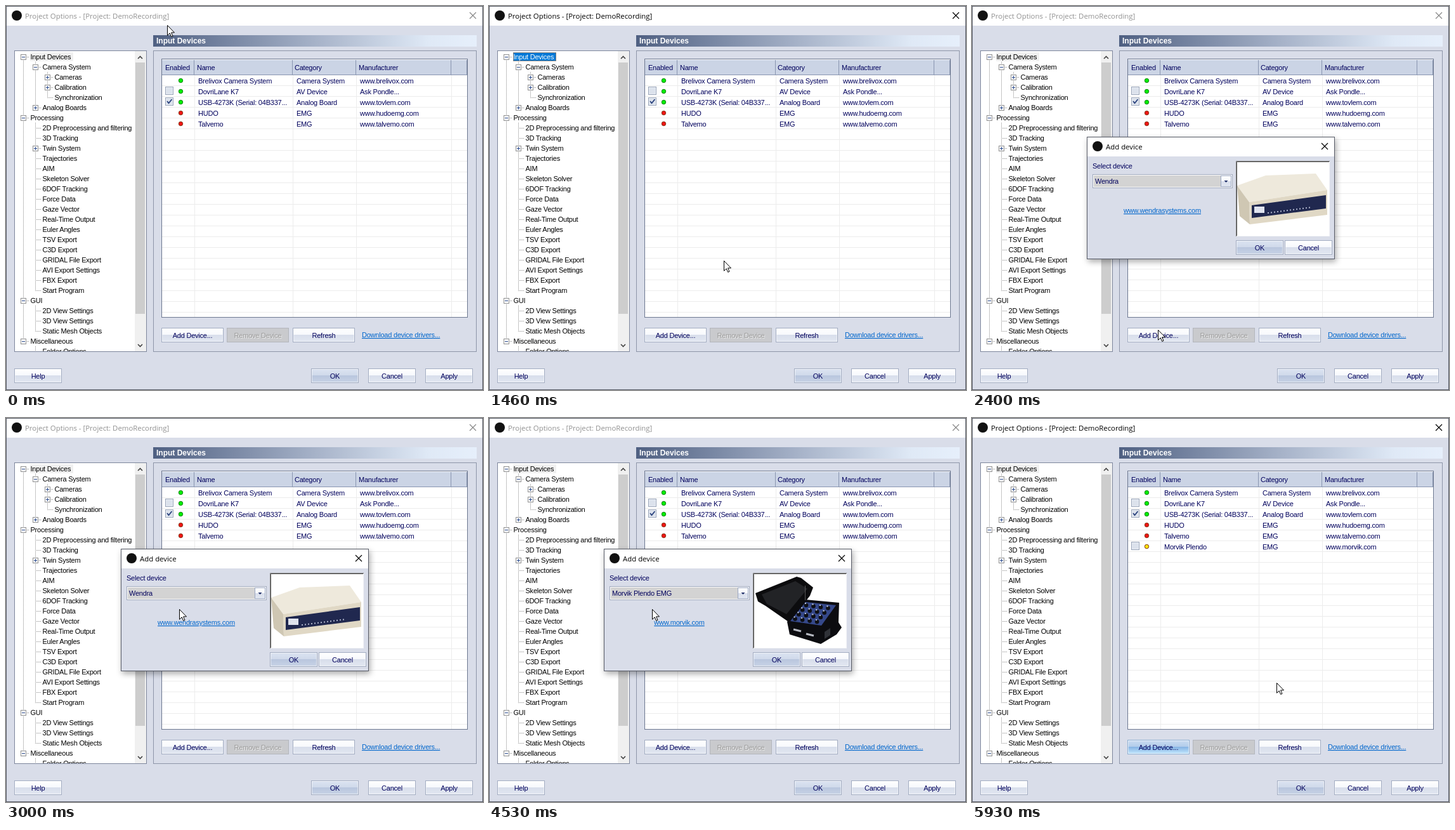
Recreate the animation shown at these times as an HTML page. Size 752 by 605 pixels, loop 6.06 s.

```html
<!DOCTYPE html>
<html lang="en">
<head>
<meta charset="utf-8">
<title>Project Options</title>
<style>
  html, body { margin: 0; width: 100%; height: 100%; overflow: hidden; background: #d9dde9; }
  svg { display: block; font: 11px "Liberation Sans", Arial, sans-serif; letter-spacing: -.22px; }
  text { white-space: pre; }
  .title { font: 11.4px "Open Sans", "Noto Sans", sans-serif; letter-spacing: 0; }
  .band { font-weight: bold; font-size: 12px; letter-spacing: 0; }
  .link { fill: #0066cc; text-decoration: underline; }
  .shadow { filter: drop-shadow(2px 4px 5px #0005); }
</style>
</head>
<body>
<svg width="752" height="605" viewBox="0 0 752 605">
  <defs>
    <linearGradient id="band">
      <stop stop-color="#4f6082"/><stop offset=".5" stop-color="#a6b2c8"/>
      <stop offset=".85" stop-color="#dfe9f6"/><stop offset="1" stop-color="#e6effb"/>
    </linearGradient>
    <linearGradient id="plain" x2="0" y2="1">
      <stop stop-color="#fff"/><stop offset=".5" stop-color="#f6f8fc"/>
      <stop offset=".5" stop-color="#d8deeb"/><stop offset="1" stop-color="#e3e8f2"/>
    </linearGradient>
    <linearGradient id="main" x2="0" y2="1">
      <stop stop-color="#dbe3f1"/><stop offset=".5" stop-color="#cfd9ea"/>
      <stop offset=".5" stop-color="#b9c6de"/><stop offset="1" stop-color="#c8d3e6"/>
    </linearGradient>
    <linearGradient id="hot" x2="0" y2="1">
      <stop stop-color="#cbdcf1"/><stop offset=".5" stop-color="#b0cbea"/>
      <stop offset=".5" stop-color="#86b4e4"/><stop offset="1" stop-color="#c4e9ff"/>
    </linearGradient>
    <linearGradient id="off"><stop stop-color="#c9cacd"/></linearGradient>
    <clipPath id="treeClip"><path d="M14 71H203V544H14Z"/></clipPath>
  </defs>
  <g id="stage"></g>
</svg>
<script>
const LOOP = 6060, NAVY = '#00005c', BODY = '#d9dde9', BLUE = '#0078d7';
const stage = document.getElementById('stage');

// Tree rows: depth, box sign ("." for none), label
const tree = `0-Input Devices|1-Camera System|2+Cameras|2+Calibration|2.Synchronization|1+Analog Boards
0-Processing|1.2D Preprocessing and filtering|1.3D Tracking|1+Twin System|1.Trajectories|1.AIM
1.Skeleton Solver|1.6DOF Tracking|1.Force Data|1.Gaze Vector|1.Real-Time Output|1.Euler Angles
1.TSV Export|1.C3D Export|1.GRIDAL File Export|1.AVI Export Settings|1.FBX Export|1.Start Program
0-GUI|1.2D View Settings|1.3D View Settings|1.Static Mesh Objects|0-Miscellaneous|1.Folder Options`
  .split(/[|\n]/);

// Table rows: check state, dot colour, name, category, maker
const devices = [
  ['', '#00f000', 'Brelivox Camera System', 'Camera System', 'www.brelivox.com'],
  ['off', '#00f000', 'DovriLane K7', 'AV Device', 'Ask Pondle...'],
  ['on', '#00f000', 'USB-4273K (Serial: 04B337...', 'Analog Board', 'www.tovlem.com'],
  ['', '#f01414', 'HUDO', 'EMG', 'www.hudoemg.com'],
  ['', '#f01414', 'Talvemo', 'EMG', 'www.talvemo.com'],
  ['off', '#ffe600', 'Morvik Plendo', 'EMG', 'www.morvik.com']
];
const choices = ['Wendra', 'Morvik Plendo EMG', 'HUDO', 'Talvemo', 'Talvemo EMG'];

// Pointer path: time, x, y
const path = [
  [0, 254, 30], [660, 112, 80], [800, 100, 80], [1000, 100, 80], [1260, 225, 200], [1460, 370, 401],
  [1660, 389, 521], [1930, 293, 515], [2330, 293, 515], [3000, 273, 301], [3260, 254, 264],
  [3660, 254, 264], [4130, 257, 301], [4530, 257, 301], [5060, 452, 376], [5460, 452, 376],
  [5860, 480, 416], [5930, 480, 417], [LOOP, 480, 417]
];

const clamp = v => Math.max(0, Math.min(1, v));

function slope(i, c) {
  const a = path[i - 1], b = path[i], d = path[i + 1];
  if (!a || !d || (b[c] - a[c]) * (d[c] - b[c]) <= 0) return 0;
  return (d[c] - a[c]) / (d[0] - a[0]);
}

function pointer(t) {
  const i = path.findIndex((p, n) => n && t <= p[0]) - 1;
  const a = path[i], b = path[i + 1], span = b[0] - a[0], u = (t - a[0]) / span, v = 1 - u;
  return [1, 2].map(c => Math.round(
    v * v * (1 + 2 * u) * a[c] + u * u * (3 - 2 * u) * b[c] +
    span * u * v * (v * slope(i, c) - u * slope(i + 1, c))));
}

const rect = (x, y, w, h, fill, line) => line
  ? `<rect x="${x + .5}" y="${y + .5}" width="${w - 1}" height="${h - 1}" fill="${fill}" stroke="${line}"/>`
  : `<rect x="${x}" y="${y}" width="${w}" height="${h}" fill="${fill}"/>`;
const text = (x, y, s, fill = NAVY, more = '') => `<text x="${x}" y="${y}" fill="${fill}" ${more}>${s}</text>`;
const stroke = (d, color, more = '') => `<path d="${d}" fill="none" stroke="${color}" ${more}/>`;
const poly = (points, fill) => `<polygon points="${points}" fill="${fill}"/>`;
const dot = (x, y, r, fill, line = 'none') => `<circle cx="${x}" cy="${y}" r="${r}" fill="${fill}" stroke="${line}"/>`;
const cross = (x, y, color) => stroke(`M${x - 5} ${y - 5}l10 10m0-10l-10 10`, color, 'stroke-width="1.2"');

function button(x, y, w, label, kind = 'plain') {
  const off = kind === 'off', mid = 'text-anchor="middle"', cx = x + w / 2;
  return rect(x, y, w, 23, `url(#${kind})`, off ? '#b3b6bd' : kind === 'hot' ? '#8fb0d3' : '#a3adc2') +
    (off ? text(cx + 1, y + 17, label, '#eee', mid) : rect(x + 1, y + 1, w - 2, 21, 'none', '#fff9')) +
    text(cx, y + 16, label, off ? '#9b9b9b' : NAVY, mid);
}

function treeView(focused) {
  const dots = 'stroke-dasharray="1 1"';
  let out = rect(13, 70, 209, 475, '#fff', '#7d869c') + '<g clip-path="url(#treeClip)">' +
    stroke('M27.5 80V528M46.5 88V160M65.5 104V144M46.5 184V448M46.5 472V512M46.5 536V545', '#8c8c8c', dots);
  tree.forEach((row, i) => {
    const x = 27 + 19 * row[0], y = 80 + 16 * i, sign = row[1];
    out += stroke(`M${x} ${y + .5}H${x + 10}`, '#8c8c8c', dots);
    if (sign !== '.') {
      out += rect(x - 4, y - 4, 9, 9, '#fff', '#919191') +
        stroke(`M${x - 2} ${y + .5}h5` + (sign === '+' ? `M${x + .5} ${y - 2}v5` : ''), '#2b4b8f');
    }
    if (!i) out += rect(38, 73, 68, 14, focused ? BLUE : '#f0f0f0');
    if (!i && focused) out += stroke('M38.5 73.5h67v13h-67z', '#ff8728', dots);
    out += text(x + 11.5, y + 4, row.slice(2), !i && focused ? '#fff' : '#000');
  });
  return out + '</g>' + rect(203, 71, 18, 473, '#f0f0f0') + rect(204, 89, 15, 396, '#cdcdcd') +
    stroke('M208 83l3.5-3.5 3.5 3.5M208 533l3.5 3.5 3.5-3.5', '#444', 'stroke-width="1.6"');
}

function table(count) {
  let lines = '', out = rect(245, 83, 483, 408, '#fff', '#6d7890');
  for (let y = 125.5; y < 490; y += 17) lines += `M246 ${y}H727`;
  for (const x of [297.5, 452.5, 552.5, 702.5]) lines += `M${x} 109V490`;
  out += stroke(lines, '#ececec') + rect(246, 85, 481, 24, '#cbd4e5') +
    stroke('M246 108.5H727M296.5 85V108M451.5 85V108M551.5 85V108M701.5 85V108M726.5 85V108', '#8995b0');
  [[251, 'Enabled'], [301, 'Name'], [455, 'Category'], [556, 'Manufacturer']]
    .forEach(([x, s]) => out += text(x, 101, s));
  devices.slice(0, count).forEach(([check, color, name, kind, maker], i) => {
    const y = 118 + 17 * i;
    if (check) out += rect(251, y - 8, 13, 13, '#e9edf4', '#98a4b8') + rect(253, y - 6, 9, 9, '#dce2ec');
    if (check === 'on') out += stroke(`M254 ${y - 2}l2.5 3 5-6`, '#28407c', 'stroke-width="1.8"');
    out += dot(275.5, y - .5, 3.2, color, color[1] === '0' ? '#087808' : '#7d3010') +
      text(303, y + 4, name) + text(458, y + 4, kind) + text(558, y + 4, maker);
  });
  return out;
}

function mainWindow(active, focused, hotAdd, count) {
  return rect(0, 0, 752, 605, BODY, '#565a66') + rect(1, 1, 750, 30, '#fff') +
    dot(17, 15, 8, '#111') + cross(736, 15, active ? '#000' : '#888') +
    text(30, 20, 'Project Options - [Project: DemoRecording]', active ? '#000' : '#919191', 'class="title"') +
    rect(232, 46, 510, 18, 'url(#band)') + text(237, 59, 'Input Devices', '#fff', 'class="band"') +
    treeView(focused) + rect(232, 70, 510, 475, BODY, '#8d95a8') + table(count) +
    button(245, 507, 98, 'Add Device...', hotAdd ? 'hot' : 'plain') +
    button(348, 507, 98, 'Remove Device', 'off') + button(452, 507, 98, 'Refresh') +
    text(561, 522, 'Download device drivers...', '', 'class="link"') +
    button(13, 571, 75, 'Help') + button(481, 571, 75, 'OK', 'main') +
    button(571, 571, 75, 'Cancel') + button(661, 571, 75, 'Apply');
}

function paleBox() {
  let out = poly('418,283 463,267 542,264 560,290 437,309', '#eee9dc') +
    poly('418,283 437,309 438,344 422,331', '#cfc7b3') + poly('437,309 560,290 560,329 438,344', '#e0d8c5') +
    poly('441,314 558,298 558,319 441,334', '#20284f') + rect(445, 316, 16, 10, '#dfe3ee');
  for (let i = 0; i < 14; i++) out += rect(466 + i * 5, 325 - i * .65, 2, 2, '#aab0c8');
  return out;
}

function darkCase() {
  let out = poly('420,276 485,250 492,252 511,267 506,280 499,289 472,321 436,296 424,289', '#0c0c0e') +
    poly('430,278 483,257 502,269 469,309 438,293', '#222326') +
    poly('470,321 498,286 552,291 551,322 556,330 548,341 523,356 474,341', '#0c0c10') +
    poly('475,320 499,290 547,295 524,327', '#35488a');
  for (let r = 0; r < 4; r++) for (let c = 0; c < 4; c++) {
    const x = 500 + c * 11.5 - r * 5.8, y = 295 + c * 1.5 + r * 7.2;
    out += dot(x, y, 3.3, '#0e0f14') + dot(x - 1, y - 3, 1.2, '#b9c2d8');
  }
  return out + stroke('M498.500 264V287', '#555') +
    stroke('M480 333l12 3M500 340l12 3', '#b7bac2', 'stroke-width="3"') +
    poly('529,337 538,331 538,342 529,348', '#303238');
}

function dropList(s) {
  const h = Math.round(67 * clamp((s - 3400) / 200)), pick = s < 4130 ? 0 : 1;
  let out = `<clipPath id="listClip"><path d="M190 286h226v${h + 5}h-226z"/></clipPath><g clip-path="url(#listClip)">` +
    rect(194, 290, 221, h, '#0003') + rect(190, 286, 221, h, '#fff', '#6f788c');
  choices.forEach((name, i) => {
    const y = 287 + 13 * i;
    if (y + 13 > 286 + h) return;
    if (i === pick) out += rect(191, y, 219, 13, BLUE);
    out += text(194, y + 10, name, i === pick ? '#fff' : NAVY);
  });
  return out + '</g>';
}

function dialog(s, hotOk) {
  const k = s < 5500 ? clamp((s - 2130) / 270) : clamp(1 - (s - 5460) / 200);
  if (!k) return '';
  const filled = s > 2250, chosen = s >= 4530, size = .946 + .054 * k;
  let out = `<g class="${filled ? 'shadow' : ''}" opacity="${k}" ` +
    `transform="translate(376 302) scale(${size}) translate(-376 -302)">` +
    rect(181, 206, 391, 193, filled ? BODY : '#fff', '#565a66') + rect(182, 207, 389, 30, '#fff') +
    dot(198, 221, 8, '#111') + text(211, 226, 'Add device', '#000', 'class="title"') + cross(556, 221, '#000');
  if (filled) {
    out += text(190, 256, 'Select device') + rect(190, 265, 221, 22, '#fff', '#a0a9bc') +
      rect(192, 267, 200, 18, s < 5260 ? '#d3d3d3' : '#fff') +
      rect(392, 267, 17, 18, 'url(#plain)', '#9ca8c2') + poly('397.500,275 403.500,275 400.500,278', '#1d2c66') +
      text(194, 280, choices[+chosen]) +
      text(300, 326, chosen ? 'www.morvik.com' : 'www.wendrasystems.com', '', 'class="link" text-anchor="middle"') +
      rect(416, 244, 148, 119, '#fff', '#f4f5f8') + stroke('M416.500 363V244.500H564', '#777') +
      stroke('M417.500 362V245.500H563', '#555') + (chosen ? darkCase() : paleBox()) +
      button(416, 369, 75, 'OK', hotOk ? 'hot' : 'main') + button(493, 369, 75, 'Cancel');
  }
  return out + '</g>' + (s >= 3460 && s < 4530 ? dropList(s) : '');
}

function scene(s) {
  const [x, y] = pointer(s), done = s >= 5530;
  const focused = s >= 60 && s < 2130;
  const overAdd = focused && x > 244 && x < 343 && y > 506 && y < 530;
  const overOk = s > 4530 && x > 415 && x < 491 && y > 368 && y < 392;
  return mainWindow(focused || done, focused, overAdd || done, done ? 6 : 5) + dialog(s, overOk) +
    `<path transform="translate(${x} ${y})" d="M.5.5V16.300L4.200 12.800 6.700 18.400 9 17.400 6.600 11.900H11.500Z" fill="#fff" stroke="#000"/>`;
}

// The picture moves at 15 steps a second: 60, 70 and 70 ms in turn.
let shown = -1;
function tick(now) {
  const t = now % LOOP, q = t % 200;
  const s = Math.round(t - q) + (q < 60 ? 0 : q < 130 ? 60 : 130);
  if (s !== shown) stage.innerHTML = scene(Math.min(shown = s, 5930));
  requestAnimationFrame(tick);
}
tick(0);
</script>
</body>
</html>
```
